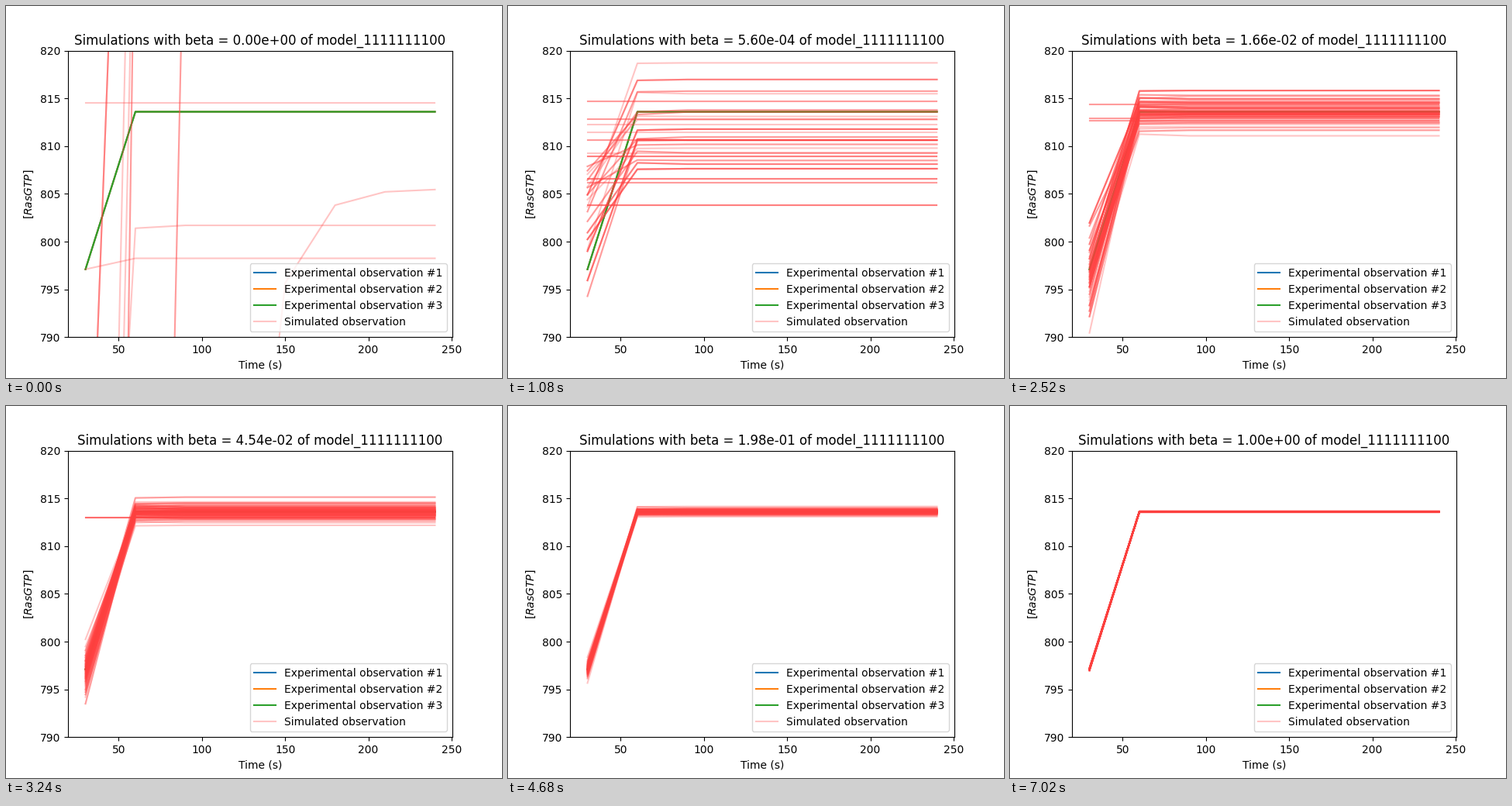
Animation of 640x480 px, one loop 7200 ms. Source, as a matplotlib script:

```python
import matplotlib.pyplot as plt
import numpy as np
from matplotlib.animation import FuncAnimation

FRAMES, STEP_MS = 40, 180
TIMES = np.arange(30, 241, 30)
START, PLATEAU = 797.1, 813.6
SIM = dict(color="#ff4040", alpha=0.3)

# Stages of the annealing between which the spread is interpolated
STAGES = [0, 6, 10, 14, 22, 30, 39]


def curve(*values):
    """Extend the first few values to the full time span."""
    return np.array(values + (values[-1],) * (len(TIMES) - len(values)), float)


def stage(k, *values):
    return np.interp(k, STAGES[:len(values)], values)


def log_stage(k, *values):
    return np.exp(stage(k, *np.log(values)))


def steep(t, slope):
    """A straight climb through the middle of the view at time t."""
    before = TIMES[TIMES < t + 30]
    return curve(*(805 + slope * (before - t)))


def prior():
    """Nearly all curves miss the view; a few cross it or settle inside."""
    late = 748 + 57.5 * (1 - np.exp(-(TIMES - 120) / 17))
    crossings = [(40.5, 4.6, 3), (52, 8, 1), (55, 8, 1), (57, 12, 2), (85.5, 8, 2)]
    climbs = [steep(t, slope) for t, slope, n in crossings for _ in range(n)]
    return climbs + [curve(814.55), curve(START, 798.25),
                     curve(710, 801.4, 801.7), late]


def spread(rng, n):
    """Evenly filled bell-shaped deviates in random order."""
    u = (np.arange(n) + rng.uniform(0.3, 0.7, n)) / n
    return rng.permutation(0.55 * np.log(u / (1 - u)))


def sample(k, previous):
    """Draw distinct curves; their spread shrinks as beta grows."""
    rng = np.random.default_rng(100 + k)
    mid = stage(k, 800, 804, 797.5, 796.5, START)
    level = stage(k, 805, 811, 812.8, 813.5, PLATEAU)
    sd_start = log_stage(k, 400, 3.6, 4, 2.4, 0.75, 0.3, 0.07)
    sd_end = log_stage(k, 300, 3.4, 2, 1.1, 0.27, 0.15, 0.025)
    flat_share = stage(k, 0.3, 0.35, 0.2, 0.02, 0)

    near = [c for c in previous if abs(c[-1] - level) < 2 * sd_end]
    kept = [c for c in near if k < 16 and rng.random() < 0.3]
    n = int(stage(k, 28, 28, 36, 45, 75)) - len(kept)

    starts = mid + sd_start * spread(rng, n)
    ends = level + sd_end * spread(rng, n)
    drifts = min(0.12, 0.25 * sd_end) * rng.normal(size=n)
    fresh = []
    for start, end, drift in zip(starts, ends, drifts):
        if start > end or rng.random() < flat_share:
            fresh.append(curve(end))
        else:
            fresh.append(curve(start, end - drift, end))
    return kept + fresh


def resample(k, curves):
    """Repeat curves, as several particles share one while beta is small."""
    rng = np.random.default_rng(500 + k)
    copies = 1 + rng.poisson(stage(k, 1, 1, 0.9, 0.7, 0), len(curves))
    return [c for c, n in zip(curves, copies) for _ in range(n)]


def build():
    current = prior()
    runs = [current]
    for k in range(1, FRAMES):
        current = sample(k, current)
        runs.append(resample(k, current))
    return runs


runs = build()

fig, ax = plt.subplots(figsize=(6.4, 4.8), dpi=100)
for n in (1, 2, 3):
    ax.plot(TIMES, curve(START, PLATEAU), label=f"Experimental observation #{n}")
ax.plot([], [], label="Simulated observation", **SIM)
lines = [ax.plot([], [], **SIM)[0] for _ in range(max(map(len, runs)))]
ax.set(xlim=(19.5, 250.5), ylim=(790, 820),
       xlabel="Time (s)", ylabel="$[RasGTP]$")
ax.legend(loc="lower right")
title = ax.set_title("")


def update(k):
    beta = (k / (FRAMES - 1)) ** 4
    title.set_text(f"Simulations with beta = {beta:.2e} of model_1111111100")
    for i, line in enumerate(lines):
        if i < len(runs[k]):
            line.set_data(TIMES, runs[k][i])
        else:
            line.set_data([], [])
    return [title, *lines]


anim = FuncAnimation(fig, update, frames=FRAMES, interval=STEP_MS,
                     repeat=True, repeat_delay=0, blit=False)
plt.show()
```
